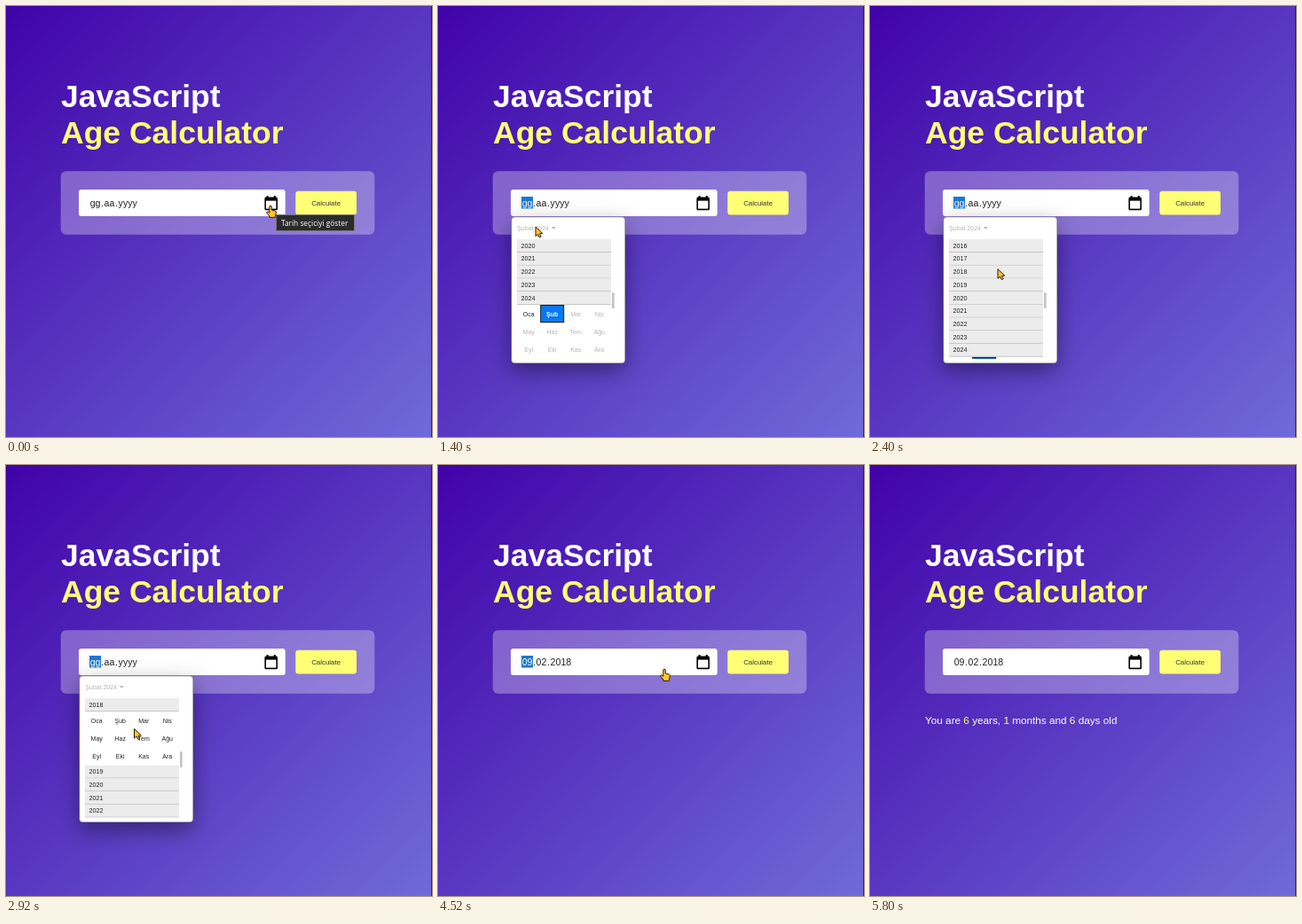
An HTML page with a canvas for the animation above (5840 ms loop, 480x486 px).

```html
<!DOCTYPE html>
<html lang="tr">
<head>
<meta charset="utf-8">
<title>Age Calculator</title>
<style>
html, body { margin: 0; width: 100%; height: 100%; overflow: hidden; background: #4203a9; }
canvas { display: block; width: 480px; height: 486px; }
</style>
</head>
<body>
<canvas width="480" height="486"></canvas>
<script>
const ctx = document.querySelector('canvas').getContext('2d');
const LOOP = 5840;
const OPEN = 360, YEARS = 1360, EXPAND = 2480, PICK = 3280, CLOSE = 4220, RESULT = 5080;
const SANS = '"Liberation Sans", Arial, sans-serif';
const YELLOW = '#ffff76', BLUE = '#0b78ee';
const DAYS = ['Pt', 'Sa', 'Ça', 'Pe', 'Cu', 'Ct', 'Pa'];
const MONTHS = ['Oca', 'Şub', 'Mar', 'Nis', 'May', 'Haz', 'Tem', 'Ağu', 'Eyl', 'Eki', 'Kas', 'Ara'];
const ROW = 14.7, MONTHS_H = 60.7, LIST_TOP = 263.3, CELL = 16.55;

// time, x, y of the pointer tip
const PATH = [
  [0, 298, 225], [360, 298, 225], [840, 143.5, 283], [1180, 110, 249], [1400, 110, 249],
  [1880, 132.5, 276.5], [2050, 132.5, 276.5], [2450, 144.5, 297.5], [2920, 144.5, 297.5],
  [3160, 130, 290], [3320, 130, 290], [3880, 153, 320.5], [4080, 162, 306], [4220, 162, 306],
  [4520, 255, 230], [4780, 352, 222], [5130, 352, 222], [5640, 500, 330]
];

const HAND = new Path2D('M-1.2 .8 Q0-.8 1.2.8 V5 L5.2 6 Q6.6 6.5 6.4 8 L5.4 12 V13.4 H-1 V12 L-4.2 8.4 Q-4.6 6.6-2.8 7 L-1.2 8.2Z');
const ARROW = new Path2D('M0 0 V10.6 L2.5 8.4 L4.3 12 L6.2 11 L4.5 7.7 L7.8 7.4Z');

function ease(t, from, to) {
  const p = Math.min(1, Math.max(0, (t - from) / (to - from)));
  return p * p * (3 - 2 * p);
}

function text(str, x, y, size, color, { align = 'left', weight = 400, family = SANS } = {}) {
  ctx.font = `${weight} ${size}px ${family}`;
  ctx.textAlign = align;
  ctx.fillStyle = color;
  ctx.fillText(str, x, y);
  return ctx.measureText(str).width;
}

function rect(x, y, w, h, color) {
  ctx.fillStyle = color;
  ctx.fillRect(x, y, w, h);
}

function round(x, y, w, h, r, color) {
  ctx.fillStyle = color;
  ctx.beginPath();
  ctx.roundRect(x, y, w, h, r);
  ctx.fill();
}

function framed(x, y, w, h, fill, line) {
  rect(x, y, w, h, line);
  rect(x + 1, y + 1, w - 2, h - 2, fill);
}

function clipped(x, y, w, h, draw) {
  ctx.save();
  ctx.beginPath();
  ctx.rect(x, y, w, h);
  ctx.clip();
  draw();
  ctx.restore();
}

function pointerAt(t) {
  const i = PATH.findIndex(k => k[0] > t);
  if (i < 0) return PATH[PATH.length - 1].slice(1);
  const [a, b] = [PATH[i - 1], PATH[i]];
  const p = ease(t, a[0], b[0]);
  return [a[1] + (b[1] - a[1]) * p, a[2] + (b[2] - a[2]) * p];
}

function drawPage(t) {
  const sky = ctx.createLinearGradient(0, 0, 483, 483);
  sky.addColorStop(0, '#4102a8');
  sky.addColorStop(1, '#6f6bd9');
  rect(0, 0, 480, 486, sky);
  rect(479, 0, 1, 486, 'rgba(15,10,45,.65)');

  text('JavaScript', 62, 114, 35.5, '#fff', { weight: 700 });
  text('Age Calculator', 62, 155, 35.5, YELLOW, { weight: 700 });
  round(61.7, 186.2, 353.6, 71.6, 6, 'rgba(255,255,255,.3)');
  round(82, 207, 232.7, 30, 3, '#fff');
  round(326.3, 208.7, 68.7, 26.8, 3, YELLOW);
  text('Calculate', 360.6, 225, 7.9, '#333', { align: 'center' });
  drawDate(t);

  rect(293.6, 214, 2, 3, '#000');
  rect(301.8, 214, 2, 3, '#000');
  round(291.4, 215.4, 14.6, 14.8, 1.5, '#000');
  rect(293, 219.6, 11.4, 9, '#fff');

  if (t >= RESULT) {
    let x = 62;
    for (const part of 'You are |6| years, |1| months and |6| days old'.split('|'))
      x += text(part, x, 292, 11.75, /^\d$/.test(part) ? YELLOW : '#fff');
  }
}

function drawDate(t) {
  const [d, m, y] = t < PICK ? ['gg', 'aa', 'yyyy'] : [t < CLOSE ? '15' : '09', '02', '2018'];
  const active = t >= OPEN && t < RESULT;
  if (active) rect(94, 215, 13, 13.5, '#1d76d0');
  text(d, 94.7, 225.7, 10.6, active ? '#fff' : '#222');
  text('.', 107, 225.7, 10.6, '#222');
  text(m, 110.5, 225.7, 10.6, '#222');
  text('.', 123, 225.7, 10.6, '#222');
  text(y, 126.6, 225.7, 10.6, '#222');
}

function drawPopup(t, pointer) {
  ctx.save();
  ctx.shadowColor = 'rgba(0,0,0,.4)';
  ctx.shadowBlur = 24;
  ctx.shadowOffsetY = 9;
  round(82.5, 237.5, 128.5, 165.5, 4, '#8f8b9c');
  ctx.restore();
  round(83.2, 238.2, 127.1, 164.1, 3.5, '#fff');

  const list = t >= YEARS && t < PICK;
  const year = t < PICK ? 2024 : 2018;
  const color = list ? '#b4b4b4' : '#111';
  text(`Şubat ${year}`, 89.2, 253, 7, color, { weight: list ? 400 : 700 });
  ctx.beginPath();
  ctx.moveTo(128, 249);
  ctx.lineTo(132.4, 249);
  ctx.lineTo(130.2, 251.8);
  ctx.fill();
  if (list) drawYears(t);
  else drawDays(year, pointer);
}

function drawStep(x, dir, color) {
  ctx.strokeStyle = color;
  ctx.lineWidth = 1;
  ctx.beginPath();
  ctx.moveTo(x, 251 + 4.7 * dir);
  ctx.lineTo(x, 251 - 4.7 * dir);
  ctx.moveTo(x - 4.2, 251 - .5 * dir);
  ctx.lineTo(x, 251 - 4.7 * dir);
  ctx.lineTo(x + 4.2, 251 - .5 * dir);
  ctx.stroke();
}

function drawDays(year, [px, py]) {
  const length = year === 2024 ? 29 : 28;
  const lastDay = year === 2024 ? 15 : 99;
  const hover = [Math.floor((px - 88.7) / CELL), Math.floor((py - 281) / CELL)];
  drawStep(177, 1, '#444');
  drawStep(196, -1, year === 2024 ? '#c4c4c4' : '#444');
  DAYS.forEach((name, i) => text(name, 97 + i * CELL, 274.7, 7, '#222', { align: 'center' }));

  for (let i = 0; i < 42; i++) {
    const col = i % 7, row = Math.floor(i / 7), day = i - 2;
    const x = 97 + col * CELL, y = 289.2 + row * CELL;
    const outside = day < 1 || day > length;
    const label = day < 1 ? day + 31 : day > length ? day - length : day;
    const picked = day === 15;
    if (picked) framed(x - 8.5, y - 8.3, 17, 16.6, BLUE, '#101830');
    else if (day <= lastDay && col === hover[0] && row === hover[1])
      framed(x - 8.5, y - 8.3, 17, 16.6, '#bcd7f5', '#56708f');
    const color = picked ? '#fff' : day > lastDay ? '#bbb' : outside ? '#7c7c7c' : '#222';
    text(label, x, y + 2.5, 7, color, { align: 'center', weight: picked ? 700 : 400 });
  }
  text('Temizle', 95.5, 392.6, 7, '#0b74d8');
  text('Bugün', 198, 392.6, 7, '#0b74d8', { align: 'right' });
}

function drawYears(t) {
  const grow = ease(t, EXPAND, EXPAND + 220);
  const top = 2020 - 4 * ease(t, 2040, 2400) + 2 * grow;
  clipped(88, LIST_TOP, 108, 134.4, () => {
    for (let year = 2014; year <= 2024; year++) {
      const y = LIST_TOP + (year - top) * ROW + (year > 2018 ? MONTHS_H * grow : 0);
      rect(89, y, 106, ROW, '#ececec');
      rect(89, y + ROW - .8, 106, .8, '#bdbdbd');
      text(year, 93.6, y + 9.4, 7.2, '#222');
      const open = year === 2018 ? grow : year === 2024 ? 1 - grow : 0;
      if (open) clipped(88, y + ROW, 108, MONTHS_H * open, () => drawMonths(year, y + ROW));
    }
  });
  round(196, 323, 2.6, 18, 1, '#c2c2c2');
}

function drawMonths(year, top) {
  MONTHS.forEach((name, i) => {
    const x = 102.2 + (i % 4) * 26.5, y = top + 10.2 + Math.floor(i / 4) * 20;
    const picked = year === 2024 && i === 1;
    if (picked) framed(x - 13.5, y - 10, 27, 20, BLUE, '#101830');
    const color = picked ? '#fff' : year === 2024 && i > 1 ? '#b4b4b4' : '#222';
    text(name, x, y + 2.5, 7, color, { align: 'center', weight: picked ? 700 : 400 });
  });
}

function drawTooltip() {
  framed(304, 235, 89, 19, '#2b2b2b', '#77757f');
  text('Tarih seçiciyi göster', 310, 247.6, 8.35, '#fff', { family: '"Open Sans", "Noto Sans", sans-serif' });
}

function drawPointer([x, y], popup) {
  const link = !popup && y > 207 && y < 237 && (x > 82 && x < 315 || x > 326 && x < 395);
  const shape = link ? HAND : ARROW;
  ctx.save();
  ctx.translate(x, y);
  ctx.fillStyle = '#ffc928';
  ctx.strokeStyle = '#2a1a10';
  ctx.lineWidth = 1;
  ctx.lineJoin = 'round';
  ctx.fill(shape);
  ctx.stroke(shape);
  ctx.restore();
}

function frame(now) {
  const t = now % LOOP;
  const pointer = pointerAt(t);
  const popup = t >= OPEN && t < CLOSE;
  drawPage(t);
  if (popup) drawPopup(t, pointer);
  if (t < OPEN) drawTooltip();
  drawPointer(pointer, popup);
  requestAnimationFrame(frame);
}
requestAnimationFrame(frame);
</script>
</body>
</html>
```
